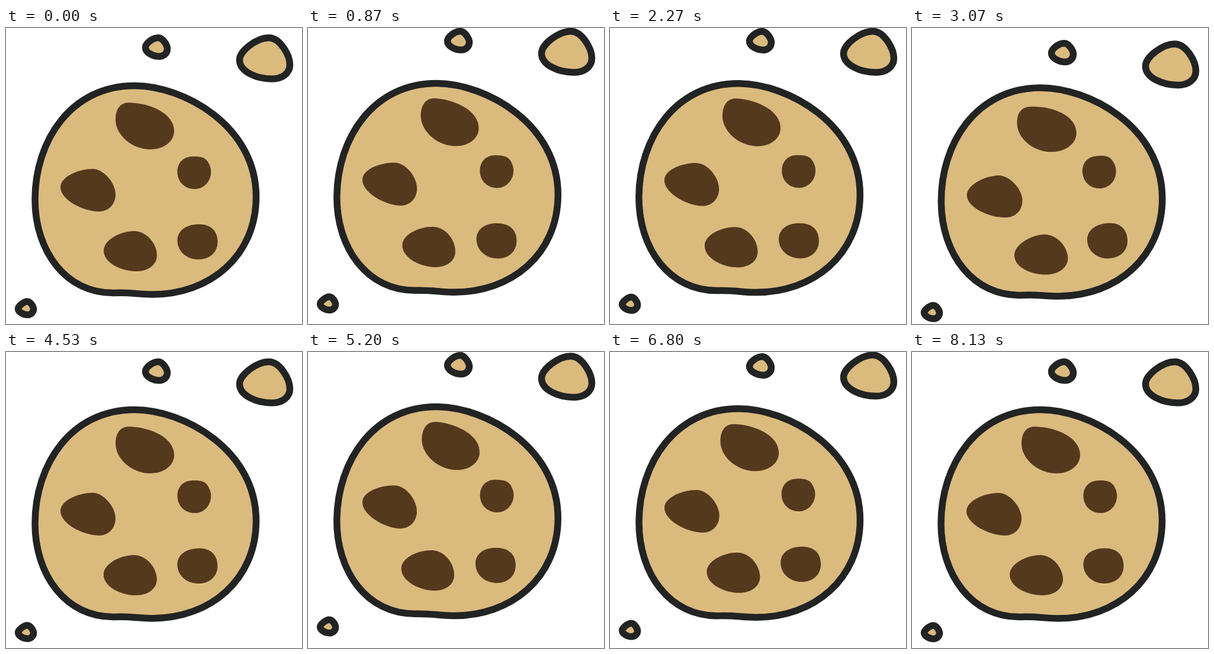
An HTML page for the animation above (8870 ms loop, 500x500 px).

```html
<!DOCTYPE html>
<html lang="en">
<head>
<meta charset="utf-8">
<title>Cookie</title>
<style>
  html, body { margin: 0; width: 100%; height: 100%; overflow: hidden; background: #fff; }
  svg { display: block; width: 100vw; height: 100vh; }
  .dough { fill: #dbba7e; stroke: #222323; stroke-width: 11.5; stroke-linejoin: round; }
  #chips { fill: #54391d; }
</style>
</head>
<body>
<svg viewBox="0 0 500 500">
  <path id="cookie" class="dough" d="M217 97.5C300 97.5 422.500 165 422.500 285C422.500 385 345 450 247 450C222 450 212 446.5 185 447.5C100 450 49 375 49 290C49 190 110 97.5 217 97.5Z"/>
  <g id="chips">
    <path d="M208 126C245 127 284 145 284 174C284 192 266 205 244 205C212 205 185 180 185 155C185 138 192 126 208 126Z"/>
    <path d="M289.5 243C289.5 229 298 217.5 315 217C328 216.5 336 218 341 226C345 233 347 238 346 247C344 262 332 272 319 272C301 272 289.5 259 289.5 243Z"/>
    <path d="M92 269C92 250 125 238 146 238C165 238 185 262 185 281C185 298 173 310 157 310C130 310 92 290 92 269Z"/>
    <path d="M165 376C165 357 195 343 216 343C238 343 255 365 255 384C255 400 240 411 220 411C195 411 165 397 165 376Z"/>
    <path d="M289.5 359C289.5 343 303 332 325 331.5C346 331 357.5 343 357.5 361C357.5 380 343 391 325 391C304 391 289.5 376 289.5 359Z"/>
  </g>
  <path id="large" class="dough" d="M394.5 54C394.5 38 424 16.5 444 16.5C463 16.5 479.5 46 479.5 62C479.5 77 466 86 449 86C424 86 394.5 74 394.5 54Z"/>
  <path id="medium" class="dough" d="M235.5 33C235.5 26 248 16.5 257 16.5C265 16.5 272.5 29 272.5 35C272.5 43 266 48 259 48C249 48 235.5 42 235.5 33Z"/>
  <path id="small" class="dough" d="M20.5 474C20.5 470 30 462 36 462C41 462 46.5 470 46.5 475C46.5 480 42 484.5 36.5 484.5C30 484.5 20.5 480 20.5 474Z"/>
</svg>
<script>
const LOOP = 8870, CYCLE = LOOP / 2, STEP = LOOP / 133, SWING = 690;

// Two eased swings between a and b, starting and ending at rest.
function swing(time, start, a, b) {
  const keys = [0, a, b, a, b, 0];
  const pos = Math.min(Math.max((time - start) / SWING, 0), 4.9999);
  const i = Math.floor(pos);
  const ease = (1 - Math.cos((pos - i) * Math.PI)) / 2;
  return keys[i] + (keys[i + 1] - keys[i]) * ease;
}

function place(id, y, angle = 0) {
  document.getElementById(id).setAttribute(
    "transform", `translate(0 ${y}) rotate(${angle} 236 263)`);
}

function draw(now) {
  const frame = Math.floor((now % LOOP) / STEP + 0.1);
  const time = (frame * STEP) % CYCLE;
  const turn = swing(time, 35, 3.9, -6);
  place("cookie", swing(time, 35, -4.8, 4.8), turn * 0.17);
  place("chips", swing(time, 90, -6.5, 6), turn);
  place("small", swing(time, 35, -10, 10));
  place("medium", swing(time, 155, -11, 10.5));
  place("large", swing(time, 265, -11.5, 10.5));
}

const began = performance.now();
(function tick() {
  draw(performance.now() - began);
  requestAnimationFrame(tick);
})();
</script>
</body>
</html>
```
